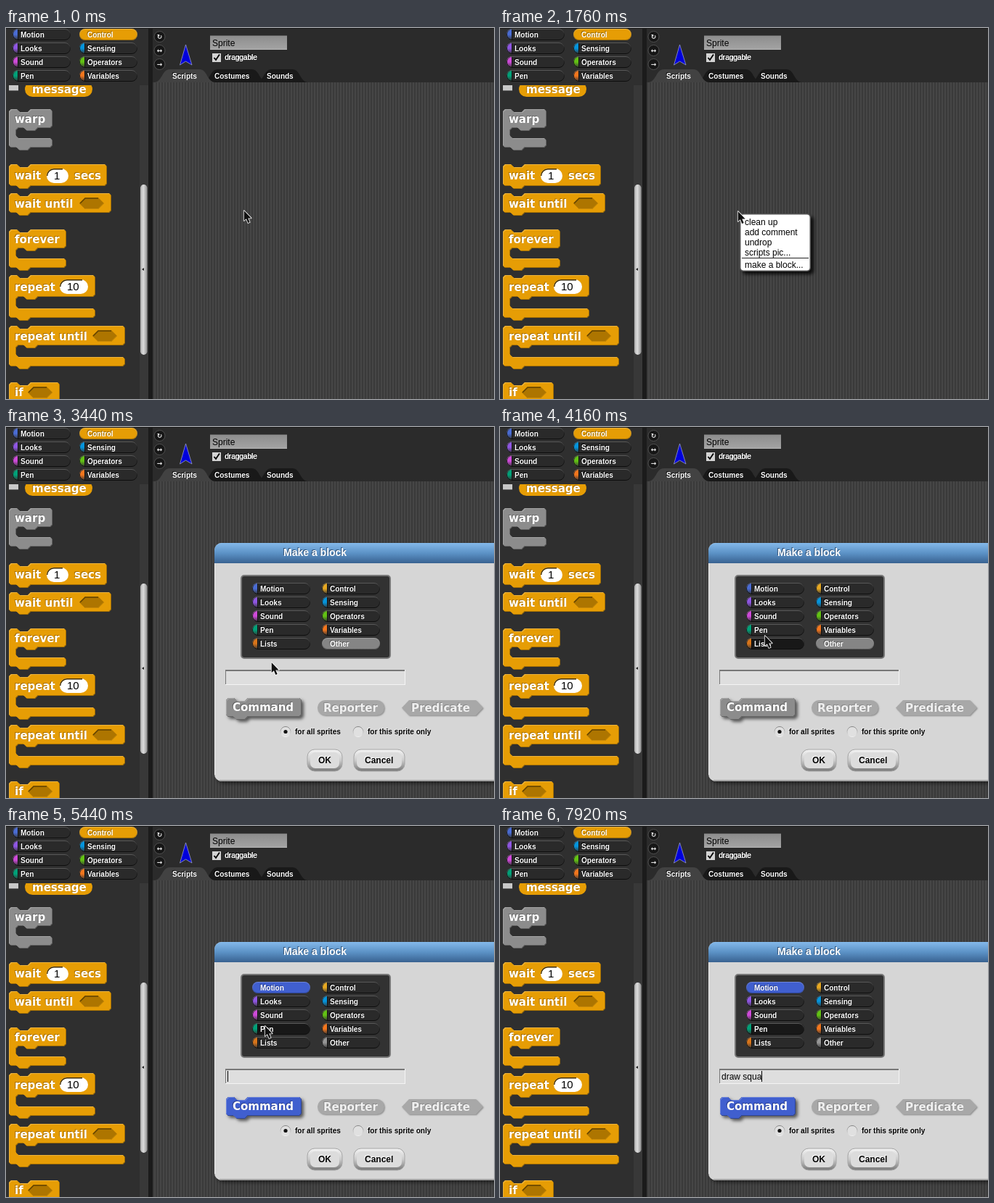
These frames come from a looping animation (672 by 512 pixels, 8000 ms). An HTML page with a canvas:

```html
<!DOCTYPE html>
<html lang="en">
<head>
<meta charset="utf-8">
<title>Make a block</title>
<style>
  html, body { margin: 0; width: 100%; height: 100%; overflow: hidden; background: #2f2f2f; }
  canvas { display: block; }
</style>
</head>
<body>
<canvas id="stage" width="672" height="512"></canvas>
<script>
const ctx = document.getElementById('stage').getContext('2d');
const LOOP = 8000, STEP = 80;
const SANS = '"Liberation Sans", Arial, sans-serif';
const WIDE = '"DejaVu Sans", Verdana, sans-serif';
const ORANGE = '#e69d05', BLUE = '#405fcf', GRAY = '#8c8c8c';
// name, colour, colour when selected
const CATS = [
  ['Motion', '#4a6cd4', BLUE], ['Looks', '#8f56e3'], ['Sound', '#cf4ad9'], ['Pen', '#00a178'], ['Lists', '#d9751a'],
  ['Control', '#e6a822', ORANGE], ['Sensing', '#0494dc'], ['Operators', '#62c213'], ['Variables', '#f3761d'],
  ['Other', '#969696', '#858585']
];

function fill(style) { ctx.fillStyle = style; ctx.fill(); }
function stroke(style, w = 1) { ctx.strokeStyle = style; ctx.lineWidth = w; ctx.stroke(); }
function rect(x, y, w, h, style) { ctx.fillStyle = style; ctx.fillRect(x, y, w, h); }
function round(x, y, w, h, r) { ctx.beginPath(); ctx.roundRect(x, y, w, h, r); }
function circle(x, y, r) { ctx.beginPath(); ctx.arc(x, y, r, 0, 7); }
function poly(...p) {
  ctx.beginPath();
  for (let i = 0; i < p.length; i += 2) ctx.lineTo(p[i], p[i + 1]);
  ctx.closePath();
}
function fade(y0, y1, ...stops) {
  const g = ctx.createLinearGradient(0, y0, 0, y1);
  stops.forEach((c, i) => g.addColorStop(i / (stops.length - 1), c));
  return g;
}
function text(s, x, y, font, color, shade) {
  ctx.font = font;
  if (shade) { ctx.fillStyle = shade; ctx.fillText(s, x - 1, y - 1); }
  ctx.fillStyle = color;
  ctx.fillText(s, x, y);
}
const bold = (s, x, y, size, color, shade) => text(s, x, y, `bold ${size}px ${SANS}`, color, shade);
const plain = (s, x, y, size = 12) => text(s, x, y, `${size}px ${SANS}`, '#000');
const label = (s, x, y, shade = '#a86f00', color = '#fff') =>
  text(s, x, y, `bold 15px ${WIDE}`, color, shade);

function withShadow(color, blur, off, draw) {
  ctx.save();
  ctx.shadowColor = color;
  ctx.shadowBlur = blur;
  ctx.shadowOffsetX = ctx.shadowOffsetY = off;
  draw();
  ctx.restore();
}

function pill([name, color, picked], x, cy, state) {
  const y = cy - 8, on = state === 'on';
  round(x, y, 80, 16, 8);
  fill(on ? picked : state === 'hover' ? '#181818' : '#2a2a2a');
  ctx.save();
  ctx.clip();
  if (!on) {
    rect(x, y, 7, 16, fade(y, y + 16, color, color, '#333'));
    rect(x + 7, y, 1, 16, 'rgba(0,0,0,.55)');
  }
  ctx.restore();
  round(x + .5, y + .5, 79, 15, 7.5);
  if (on) stroke(fade(y, y + 16, 'rgba(255,255,255,.25)', 'rgba(0,0,0,.35)'));
  else stroke(fade(y, y + 16, '#5c5c5c', '#1c1c1c', '#0c0c0c'));
  bold(name, x + 11, cy + 4, 10, '#fff', on ? 'rgba(0,0,0,.35)' : '#000');
}

// A command block; with arm > 0 it becomes a C shape with an open slot.
function blockPath(x, y, w, h, slot, arm) {
  const r = x + w, b = y + h;
  ctx.beginPath();
  ctx.moveTo(x, y + 3);
  ctx.lineTo(x + 3, y);
  for (const [dx, dy] of [[11, 0], [15, 4], [26, 4], [30, 0]]) ctx.lineTo(x + dx, y + dy);
  ctx.lineTo(r - 3, y);
  ctx.lineTo(r, y + 3);
  ctx.lineTo(r, b - 3);
  ctx.lineTo(r - 3, b);
  let end = b;
  if (arm) {
    for (const [dx, dy] of [[40, 0], [36, 4], [25, 4], [21, 0], [13, 0], [10, 3]]) ctx.lineTo(x + dx, b + dy);
    const a = b + slot;
    end = a + arm;
    ctx.lineTo(x + 10, a - 3);
    ctx.lineTo(x + 13, a);
    ctx.lineTo(r - 3, a);
    ctx.lineTo(r, a + 3);
    ctx.lineTo(r, end - 3);
    ctx.lineTo(r - 3, end);
  }
  for (const [dx, dy] of [[30, 0], [26, 4], [15, 4], [11, 0], [3, 0], [0, -3]]) ctx.lineTo(x + dx, end + dy);
  ctx.closePath();
}
// Embossed: dark edge at the lower right, light edge at the upper left.
function block(x, y, w, h, color, slot = 0, arm = 0) {
  ctx.save();
  blockPath(x, y, w, h, slot, arm);
  fill(color);
  fill('rgba(0,0,0,.28)');
  ctx.clip();
  blockPath(x - 1, y - 1, w, h, slot, arm);
  fill(color);
  fill('rgba(255,255,255,.22)');
  ctx.clip();
  blockPath(x + 1, y + 1, w, h, slot, arm);
  fill(color);
  ctx.restore();
}
function hexSlot(x, y) {
  poly(x, y + 8, x + 8, y, x + 26, y, x + 34, y + 8, x + 26, y + 16, x + 8, y + 16);
  fill('#ad7500');
  ctx.beginPath();
  ctx.moveTo(x + 1, y + 8);
  ctx.lineTo(x + 8, y + 1);
  ctx.lineTo(x + 26, y + 1);
  stroke('#634300', 1.6);
  ctx.beginPath();
  ctx.moveTo(x + 8, y + 15.5);
  ctx.lineTo(x + 26, y + 15.5);
  ctx.lineTo(x + 33.5, y + 8);
  stroke('#c98a08');
}
function numSlot(s, x, y, w, tx) {
  round(x, y, w, 20, 10);
  fill('#fff');
  ctx.beginPath();
  ctx.arc(x + 10, y + 10, 9.3, Math.PI, Math.PI * 1.5);
  ctx.lineTo(x + w - 8, y + .7);
  stroke('#3f2b00', 1.5);
  plain(s, tx, y + 15, 15);
}

function palette() {
  rect(0, 0, 196, 512, '#2f2f2f');
  rect(184, 79, 12, 433, '#383838');
  ctx.save();
  ctx.beginPath();
  ctx.rect(0, 79, 184, 433);
  ctx.clip();
  rect(4, 76, 13, 10, '#c8c8c8');
  rect(4, 86, 13, 1, '#666');
  round(26, 74, 93, 21, 10.5);
  fill(ORANGE);
  label('message', 36, 90);
  block(4, 112, 60, 26, GRAY, 14, 13);
  label('warp', 12, 131, '#666');
  block(4, 188, 135, 30, ORANGE);
  label('wait', 12, 209);
  numSlot('1', 56, 194, 30, 66);
  label('secs', 94, 209);
  block(4, 228, 141, 27, ORANGE);
  label('wait until', 12, 248);
  hexSlot(101, 234);
  block(4, 278, 79, 26, ORANGE, 14, 13);
  label('forever', 12, 297);
  block(4, 341, 119, 30, ORANGE, 16, 13);
  label('repeat', 12, 363);
  numSlot('10', 74, 347, 39, 84);
  block(4, 411, 160, 27, ORANGE, 16, 13);
  label('repeat until', 12, 431);
  hexSlot(119, 417);
  block(4, 489, 70, 27, ORANGE, 16, 13);
  label('if', 12, 508);
  hexSlot(30, 495);
  ctx.restore();

  for (let i = 0; i < 4; i++) {
    pill(CATS[i], 9, 9 + i * 19);
    pill(CATS[i + 5], 101, 9 + i * 19, i === 0 && 'on');
  }
  const g = ctx.createLinearGradient(185, 0, 195, 0);
  g.addColorStop(0, '#a8a8a8');
  g.addColorStop(.4, '#dedede');
  g.addColorStop(1, '#8c8c8c');
  round(185, 216, 9.5, 235, 5);
  fill(g);
  poly(187, 333, 190, 331, 190, 335);
  fill('#222');
}

function tab(x, w, color) {
  ctx.beginPath();
  ctx.moveTo(x, 75);
  ctx.bezierCurveTo(x + 12, 74, x + 10, 57, x + 22, 57);
  ctx.lineTo(x + w - 22, 57);
  ctx.bezierCurveTo(x + w - 10, 57, x + w - 12, 74, x + w, 75);
  fill(color);
}

function editor() {
  rect(196, 0, 6, 512, '#1b1b1b');
  rect(202, 0, 470, 75, '#2b2b2b');
  rect(0, 0, 672, 1, '#1b1b1b');
  rect(202, 75, 470, 437, '#464646');
  for (let x = 202; x < 672; x += 4) rect(x, 75, 2, 437, '#3a3a3a');

  ctx.textAlign = 'center';
  ['↻', '↔', '→'].forEach((s, i) => {
    const y = 12 + i * 19;
    circle(211.5, y, 7.5);
    fill('#161616');
    stroke('#505050');
    text(s, 211.5, y + 3, `bold 9px ${WIDE}`, '#eee');
  });
  ctx.textAlign = 'left';
  poly(247.5, 23, 256, 51, 247.5, 46, 239.5, 51);
  fill('#0000dc');
  stroke('#9aa0c8', .8);

  rect(281, 10, 106, 20, fade(10, 30, '#8c8c8c', '#a4a4a4'));
  rect(281, 10, 106, 1, '#5a5a5a');
  rect(281, 29, 106, 1, '#b5b5b5');
  plain('Sprite', 284, 25);
  rect(284, 35, 12, 12, '#d4d4d4');
  ctx.beginPath();
  ctx.moveTo(286.5, 41);
  ctx.lineTo(289, 44);
  ctx.lineTo(294, 36.5);
  stroke('#000', 1.8);
  text('draggable', 301, 44, `10px ${SANS}`, '#fff', '#000');
  ctx.fillText('draggable', 301.5, 44);

  tab(344, 72, '#191919');
  tab(270, 90, '#191919');
  tab(204, 84, '#424242');
  bold('Scripts', 229, 70, 10, '#fff', '#111');
  bold('Costumes', 287, 70, 10, '#fff', '#000');
  bold('Sounds', 359, 70, 10, '#fff', '#000');
}

function menu(picked) {
  withShadow('rgba(0,0,0,.8)', 4, 4, () => {
    round(330, 256, 98, 80, 5);
    fill('#555');
  });
  round(331.5, 257.5, 95, 77, 4);
  fill('#fff');
  if (picked >= 0) rect(333, picked === 4 ? 320 : 261 + picked * 14, 92, 14, '#b9b9b9');
  rect(333, 317, 92, 1, '#222');
  ['clean up', 'add comment', 'undrop', 'scripts pic...', 'make a block...']
    .forEach((s, i) => plain(s, 337, i === 4 ? 331 : 272 + i * 14));
}

function button(s, x, w, tx) {
  round(x, 445, w, 30, 10);
  fill(fade(445, 475, '#f4f4f4', '#ccc', '#777'));
  stroke('#a5a5a5');
  round(x + 4, 449, w - 8, 22, 7);
  fill('#dcdcdc');
  bold(s, tx, 464, 12, '#000', '#fff');
}

function radio(s, x, on) {
  circle(x, 420.5, 7);
  fill('#e0e0e0');
  stroke(fade(413, 428, '#808080', '#f4f4f4'));
  if (on) { circle(x, 420.5, 2.6); fill('#111'); }
  bold(s, x + 13, 424, 10, '#000', '#eee');
}

function dialog(selected, hover, typed, caret) {
  withShadow('rgba(0,0,0,.5)', 5, 3, () => {
    round(287, 160, 400, 329, 10);
    fill('#d6d6d6');
  });
  round(287, 160, 400, 28, [10, 10, 0, 0]);
  fill(fade(160, 188, '#84b9ea', '#5c92c6', '#396291'));
  rect(287, 188, 1, 292, '#efefef');
  rect(294, 487, 378, 2, '#a2a2a2');
  bold('Make a block', 382, 178, 14, '#fff', '#305278');

  round(324, 205, 205, 114, 4);
  fill('#323232');
  stroke('#777', 2);
  CATS.forEach((cat, i) => pill(cat, i < 5 ? 339 : 435, 223 + (i % 5) * 19,
    i === selected ? 'on' : i === hover ? 'hover' : ''));

  rect(302, 335, 248, 21, '#dedede');
  rect(302, 335, 248, 2, '#777');
  rect(302, 335, 1, 21, '#777');
  rect(302, 355, 248, 1, '#f4f4f4');
  rect(549, 335, 1, 21, '#f4f4f4');
  plain(typed, 305, 350);
  if (caret) rect(305 + Math.round(ctx.measureText(typed).width), 338, 1, 15, '#000');

  const blue = selected === 0;
  withShadow('rgba(0,0,0,.6)', 4, 3, () => {
    blockPath(303, 374, 104, 26);
    fill('#777');
  });
  block(303, 374, 104, 26, blue ? BLUE : GRAY);
  label('Command', 312, 392, blue ? '#2b4192' : '#636363');
  withShadow('rgba(0,0,0,.35)', 2, 1, () => {
    round(429, 377, 92, 21, 10.5);
    fill('#a8a8a8');
    poly(545, 387.5, 555, 377, 647, 377, 657, 387.5, 647, 398, 555, 398);
    fill('#a8a8a8');
  });
  label('Reporter', 437, 393, '#888', '#f0f0f0');
  label('Predicate', 558, 393, '#888', '#f0f0f0');
  radio('for all sprites', 385, true);
  radio('for this sprite only', 485, false);
  button('OK', 415, 48, 430);
  button('Cancel', 479, 70, 494);
}

// time, x, y
const PATH = [
  [0, 328, 252], [1840, 328, 253], [2320, 350, 284], [2800, 356, 316], [3000, 366, 325], [3680, 366, 325],
  [4160, 365, 288], [4640, 367, 221], [5040, 367, 221], [5360, 357, 276], [LOOP, 357, 276]
];
function pointer(t) {
  const i = Math.max(1, PATH.findIndex(p => p[0] > t));
  const [t0, x0, y0] = PATH[i - 1], [t1, x1, y1] = PATH[i];
  const k = (t - t0) / (t1 - t0);
  return [Math.round(x0 + (x1 - x0) * k), Math.round(y0 + (y1 - y0) * k)];
}
function arrow([x, y]) {
  ctx.save();
  ctx.translate(x - .3, y);
  poly(0, 0, 0, 14, 3.2, 11.2, 5.6, 17, 8, 16, 5.6, 10.4, 10, 10.4);
  ctx.lineJoin = 'round';
  stroke('#fff', 1.6);
  fill('#111');
  ctx.restore();
}

const OPEN_MENU = 1360, OPEN_DIALOG = 3280, PICK = 4880, TYPE = 6400;

function draw(t) {
  palette();
  editor();
  const y = pointer(Math.max(0, t - STEP))[1];
  if (t >= OPEN_DIALOG) {
    const typed = t < TYPE ? '' : 'draw squa'.slice(0, 1 + Math.floor((t - TYPE) / 180));
    const row = Math.round((y - 223) / 19);
    dialog(t < PICK ? 9 : 0, row < 5 ? row : -1, typed, t >= PICK);
  } else if (t >= OPEN_MENU) {
    menu(y < 261 ? -1 : y < 319 ? Math.min(3, Math.floor((y - 261) / 14)) : 4);
  }
  if (t < TYPE) arrow(pointer(t));
}

const start = performance.now();
function frame() {
  const t = (performance.now() - start) % LOOP;
  draw(Math.floor(t / STEP) * STEP);
  requestAnimationFrame(frame);
}
frame();
</script>
</body>
</html>
```
